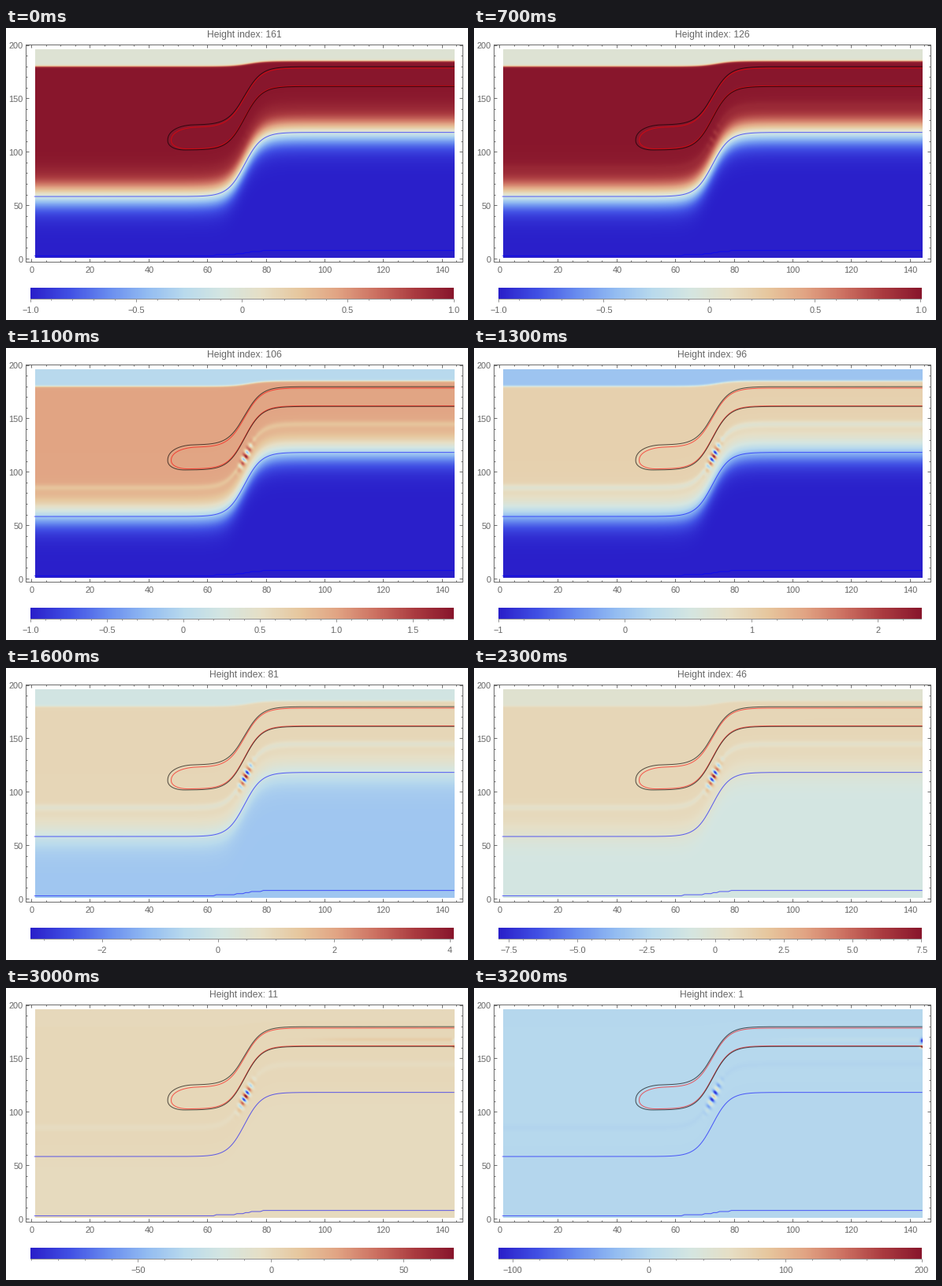
Write a matplotlib script that moves like this. It is 586 by 371 pixels and loops after 3.3 s.

```python
import numpy as np
import matplotlib.pyplot as plt
from matplotlib.animation import FuncAnimation
from matplotlib.collections import LineCollection
from matplotlib.colors import LinearSegmentedColormap

W, H, DPI = 586, 371, 100
PX = 72 / DPI
FRAMES, INTERVAL = 33, 100
GREY = "#666666"
L, R, T, B = 25.5, 579.5, 21.5, 297.5  # plot frame
BAR_L, BAR_R, BAR_B = 31, 568, 344.5

plt.rcParams["font.family"] = "Liberation Sans"
thermo = LinearSegmentedColormap.from_list("thermo", [
    "#2a1fca", "#4150e4", "#688bef", "#92bbf2", "#b9daed", "#d5e6e1",
    "#e6dfc6", "#e7c79e", "#e1a383", "#cc7061", "#aa3b40", "#88162c"], N=512)

fig = plt.figure(figsize=(W / DPI, H / DPI), dpi=DPI, facecolor="white")
ax = fig.add_axes([0, 0, 1, 1])
ax.axis("off")


def to_px(x, y):
    return 32.5 + 3.72 * np.asarray(x), 293.5 - 1.3575 * np.asarray(y)


def slope(x, left, right, mid=72.6, width=5.8):
    return (left + right) / 2 + (right - left) / 2 * np.tanh((x - mid) / width)


def bump(v, centre, width):
    return np.exp(-((v - centre) / width) ** 2)


def line(x, y, color, alpha=0.6):
    ax.plot(*to_px(x, y), color=color, alpha=alpha, lw=PX, zorder=3)


def tongue(tip, top, bottom, color, alpha):
    """Rounded band that climbs the slope to the right edge."""
    x = tip + (144 - tip) * np.linspace(0, 1, 300) ** 2
    centre = 111

    def side(levels, radius):
        u = 1 - np.clip((x - tip) / radius, 0, 1)
        return centre + (slope(x, *levels) - centre) * (1 - u ** 2.2) ** (1 / 2.2)

    line(np.r_[x[::-1], x], np.r_[side(top, 9.5)[::-1], side(bottom, 6)],
         color, alpha)


# Field sampled on screen pixels
cols, rows = np.arange(37, 569) + 0.5, np.arange(27, 292) + 0.5
X, Y = np.meshgrid((cols - 32.5) / 3.72, (293.5 - rows) / 1.3575)
above = Y - slope(X, 60, 119.5)
inside = 0.5 * (1 - np.tanh(Y - slope(X, 180.3, 185.3, 74)))
base = np.tanh(above / 14.5) * inside

across = X - 73 - 0.15 * (Y - 115)
ripple = (bump(Y, 115, 10) * bump(across, 0, 1.15)
          * np.cos(2 * np.pi * (Y - 115) / 7 + 1.6 * across))
ripple = np.where(ripple > 0, 0.74, 1) * ripple
band = -bump(above, 25.5, 3)
streak = bump(Y, 168, 1.8) / (1 + np.exp(-(X - 100) / 4))
edge = bump(X, 144.3, 0.8) * (bump(Y, 161, 1.3) - 0.6 * bump(Y, 167, 2.2))


def state(k):
    """Field and colour range for step k."""
    gain = np.exp(np.interp(k, (0, 7, 11, 16, 23, 28, 32),
                            np.log((.01, .06, 1.09, 4.2, 8.85, 75.2, 111.4))))
    rim = 200 * np.exp(-0.9 * (FRAMES - 1 - k))
    z = (base + gain * ripple + 0.15 * gain ** 0.65 * band
         + min(rim, 6) * streak + rim * edge)
    return z, min(-1, 0.96 - gain), max(1, 0.96 + 0.74 * gain, rim)


field = ax.imshow(base, cmap=thermo, vmin=-1, vmax=1, aspect="auto",
                  extent=(37, 569, 292, 27), interpolation="nearest")
ax.imshow(np.linspace(0, 1, 537)[None], cmap=thermo, aspect="auto",
          extent=(BAR_L, BAR_R, 344, 330), interpolation="nearest")
ax.set_xlim(0, W)
ax.set_ylim(H, 0)

# Contours
xs = np.arange(1, 144.5, 0.5)
line(xs, slope(xs, 58.5, 118.5), "#0000ff")
cells = np.arange(1, 145)
line(cells, np.round(slope(cells, 3.35, 8.1)), "#0000ff")
tongue(47.6, (123.3, 178.7), (103, 162.1), "#ff0000", 0.6)
tongue(46.4, (125.5, 180), (102, 161.5), "#000000", 0.65)


def label(x, y, s, size=11, ha="center"):
    return ax.text(x, y, s, fontsize=size * PX, color=GREY, ha=ha, va="baseline")


def strokes(segs, color):
    lines = LineCollection(segs, colors=color, linewidths=PX * 0.95, snap=False)
    return ax.add_collection(lines)


def pixel(v):
    return np.floor(v) + 0.5


# Frame and its ticks
segs = [[(L, T), (R, T), (R, B), (L, B), (L, T)]]
for v in range(0, 146, 5):
    p, n = pixel(to_px(v, 0)[0]), 2 if v % 20 else 4
    segs += [[(p, B), (p, B - n)], [(p, T), (p, T + n)]]
    if v % 20 == 0:
        label(p, 311, str(v))
for v in range(0, 201, 10):
    p, n = pixel(to_px(0, v)[1]), 2 if v % 50 else 4
    segs += [[(L, p), (L + n, p)], [(R, p), (R - n, p)]]
    if v % 50 == 0:
        label(21.5, p + 4, str(v), ha="right")
strokes(segs, GREY)

# Legend scale
scale = strokes([], "#8c8c8c")
marks = [label(0, 361.5, "") for _ in range(8)]
title = label(302, 12, "", 12.1)


def nice_step(span):
    """Smallest round step giving about six intervals, and its subdivision."""
    for e in range(-2, 4):
        for m in (1, 2, 2.5, 5):
            if span / (m * 10.0 ** e) <= 6.18:
                return m * 10.0 ** e, 4 if m == 2 else 5


def number(v, step):
    if abs(v) < 1e-9:
        return "0"
    s = f"{v:.0f}" if step == int(step) else f"{v:.1f}"
    return s.replace("-", "\u2212")


def draw(k):
    z, low, high = state(k)
    field.set_data(z)
    field.set_clim(low, high)
    title.set_text(f"Height index: {161 - 5 * k}")

    step, parts = nice_step(high - low)
    minor = step / parts
    lines, used = [[(BAR_L, BAR_B), (BAR_R, BAR_B)]], 0
    for m in marks:
        m.set_text("")
    for i in range(int(np.ceil(low / minor - 1e-6)),
                   int(np.floor(high / minor + 0.05)) + 1):
        x = BAR_L + (BAR_R - BAR_L) * (i * minor - low) / (high - low)
        major = i % parts == 0
        p = pixel(x)
        lines.append([(p, BAR_B), (p, BAR_B + (4 if major else 2))])
        if major and used < len(marks):
            marks[used].set_x(x)
            marks[used].set_text(number(i * minor, step))
            used += 1
    scale.set_segments(lines)
    return [field, title, scale, *marks]


anim = FuncAnimation(fig, draw, frames=FRAMES, interval=INTERVAL,
                     repeat=True, repeat_delay=0, blit=False)
plt.show()
```
